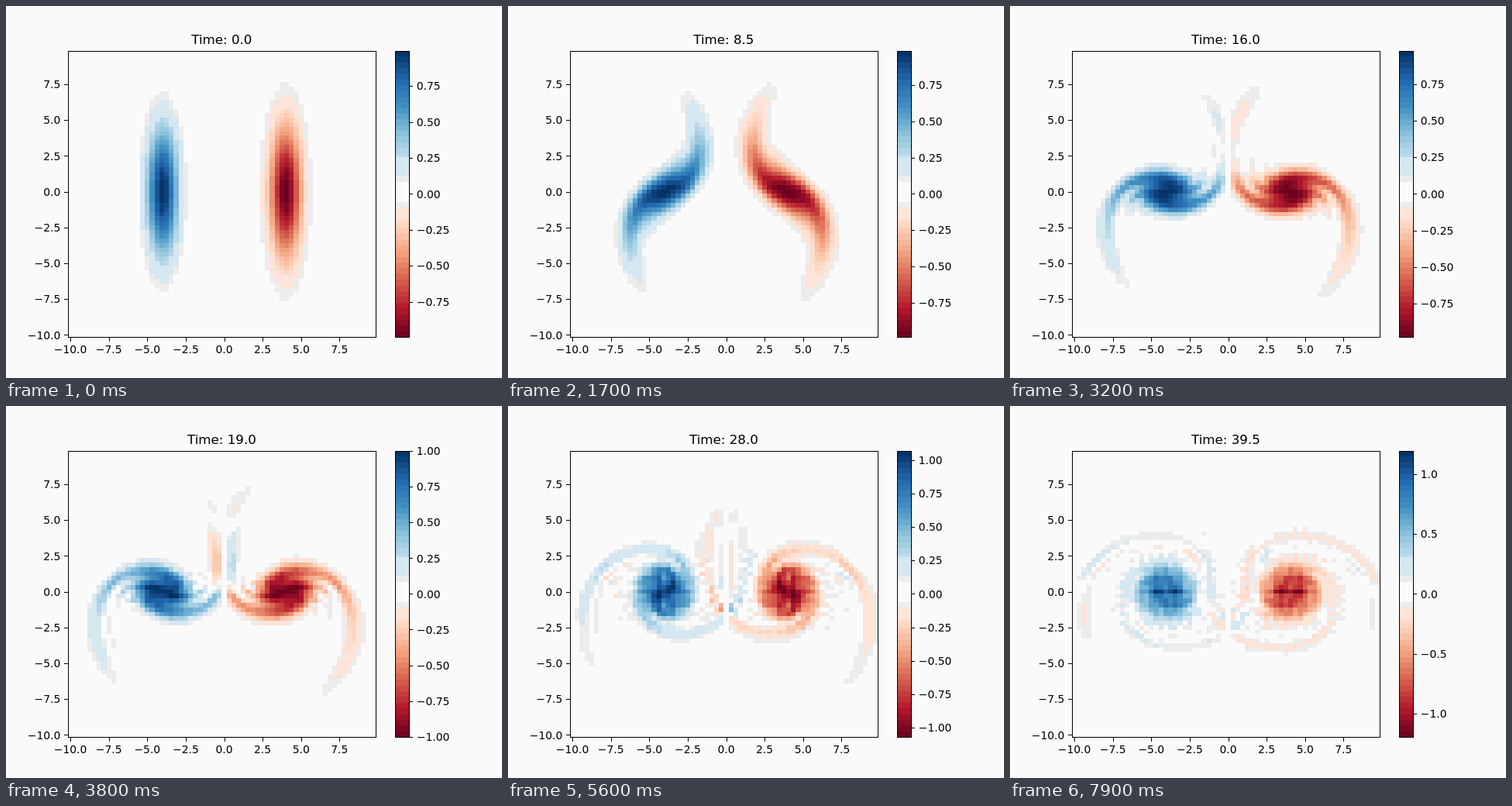
These frames come from a looping animation (640x480 px, 8000 ms). An HTML page with a canvas:

```html
<!DOCTYPE html>
<html lang="en">
<head>
<meta charset="utf-8">
<title>Vorticity</title>
<style>
html, body { margin: 0; width: 100%; height: 100%; overflow: hidden; background: #fafafa; }
canvas, svg { position: absolute; left: 0; top: 0; width: 640px; height: 480px; }
text { font: 13.89px "DejaVu Sans", sans-serif; fill: #000; }
.title { font-size: 16.67px; }
path, rect { fill: none; stroke: #000; stroke-width: 1; shape-rendering: crispEdges; }
</style>
</head>
<body>
<canvas id="plot" width="640" height="480"></canvas>
<svg viewBox="0 0 640 480">
  <g id="axes"></g>
  <g id="scale"></g>
  <text id="title" class="title" x="278.4" y="49.2" text-anchor="middle"></text>
</svg>
<script>
const N = 64, L = 20, H = L / N, NU = 0.001;
const FRAMES = 80, FRAME_MS = 100, FRAME_DT = 0.5, SUBSTEPS = 4;
const BOX = { x: 80, y: 57.6, w: 396.8, h: 369.6 };
const BAR = { x: 502, w: 18, mid: 242.4, half: 184.8 };

// ---- Poisson solver -------------------------------------------------
const cosT = [], sinT = [], bitrev = [];
for (let i = 0; i < N; i++) {
  cosT.push(Math.cos(2 * Math.PI * i / N));
  sinT.push(Math.sin(2 * Math.PI * i / N));
  let r = 0;
  for (let b = 0; b < 6; b++) if (i >> b & 1) r |= 32 >> b;
  bitrev.push(r);
}

function fftLine(re, im, start, stride, sign) {
  for (let i = 0; i < N; i++) {
    const j = bitrev[i];
    if (j <= i) continue;
    const a = start + i * stride, b = start + j * stride;
    [re[a], re[b]] = [re[b], re[a]];
    [im[a], im[b]] = [im[b], im[a]];
  }
  for (let half = 1; half < N; half *= 2) {
    const turn = N / (2 * half);
    for (let base = 0; base < N; base += 2 * half) {
      for (let k = 0; k < half; k++) {
        const c = cosT[k * turn], s = sign * sinT[k * turn];
        const a = start + (base + k) * stride, b = a + half * stride;
        const tr = re[b] * c - im[b] * s, ti = re[b] * s + im[b] * c;
        re[b] = re[a] - tr; im[b] = im[a] - ti;
        re[a] += tr; im[a] += ti;
      }
    }
  }
}

function fft2(re, im, sign) {
  for (let i = 0; i < N; i++) fftLine(re, im, i * N, 1, sign);
  for (let i = 0; i < N; i++) fftLine(re, im, i, N, sign);
}

const wave = i => 2 * Math.PI / L * (i < N / 2 ? i : i - N);

function streamFunction(w) {
  const re = w.slice(), im = new Float64Array(N * N);
  fft2(re, im, -1);
  for (let j = 0; j < N; j++) for (let i = 0; i < N; i++) {
    const k2 = wave(i) ** 2 + wave(j) ** 2, p = j * N + i;
    const f = k2 ? -1 / (k2 * N * N) : 0;
    re[p] *= f; im[p] *= f;
  }
  fft2(re, im, 1);
  return re;
}

// ---- Vorticity transport, central differences, RK4 ------------------
function rate(w) {
  const psi = streamFunction(w), out = new Float64Array(N * N);
  for (let j = 0; j < N; j++) {
    const row = j * N, up = (j + 1) % N * N, down = (j + N - 1) % N * N;
    for (let i = 0; i < N; i++) {
      const e = row + (i + 1) % N, o = row + (i + N - 1) % N, n = up + i, s = down + i;
      const turn = (psi[e] - psi[o]) * (w[n] - w[s]) - (psi[n] - psi[s]) * (w[e] - w[o]);
      const lap = w[e] + w[o] + w[n] + w[s] - 4 * w[row + i];
      out[row + i] = (turn / 4 + NU * lap) / (H * H);
    }
  }
  return out;
}

const plus = (a, b, f) => a.map((v, i) => v + f * b[i]);

function step(w, dt) {
  const a = rate(w), b = rate(plus(w, a, dt / 2));
  const c = rate(plus(w, b, dt / 2)), d = rate(plus(w, c, dt));
  return w.map((v, i) => v + dt / 6 * (a[i] + 2 * b[i] + 2 * c[i] + d[i]));
}

const states = [new Float64Array(N * N).map((_, p) => {
  const x = p % N * H - L / 2, y = Math.floor(p / N) * H - L / 2;
  return Math.exp(-((x + 4) ** 2) - y * y / 20);
})];

function stateAt(n) {
  while (states.length <= n) {
    let w = states[states.length - 1];
    for (let k = 0; k < SUBSTEPS; k++) w = step(w, FRAME_DT / SUBSTEPS);
    states.push(w);
  }
  return states[n];
}

// ---- Colours --------------------------------------------------------
const RDBU = ["67001f", "b2182b", "d6604d", "f4a582", "fddbc7", "f7f7f7",
  "d1e5f0", "92c5de", "4393c3", "2166ac", "053061"]
  .map(h => [0, 2, 4].map(i => parseInt(h.substr(i, 2), 16)));

function ramp(v) {
  const t = Math.min(9.999, Math.max(0, (v + 1) * 5)), i = Math.floor(t);
  return `rgb(${RDBU[i].map((c, k) => Math.round(c + (RDBU[i + 1][k] - c) * (t - i)))})`;
}

function colour(v) {
  if (v > -0.056 && v < 0.085) return "#fafafa";
  if (v > -0.095 && v < 0.126) return "#ececec";
  if (v > 0 && v < 0.256) return "#d5e7f1";
  if (v < 0 && v > -0.175) return "#fce4d8";
  const band = 0.04;
  return ramp(Math.sign(v) * (Math.floor(Math.abs(v) / band) + 0.5) * band);
}

// ---- Drawing --------------------------------------------------------
const $ = id => document.getElementById(id);
const ctx = $("plot").getContext("2d");
const label = (v, digits) => v.toFixed(digits).replace("-", "\u2212");
const text = (x, y, s, anchor) => `<text x="${x}" y="${y}" text-anchor="${anchor}">${s}</text>`;
const px = v => Math.round(v) + 0.5;

function drawAxes() {
  let out = '<rect x="80.5" y="58.5" width="397" height="369"/>';
  for (let v = -10; v < 9; v += 2.5) {
    const f = (v + L / 2 + H / 2) / L;
    const x = BOX.x + f * BOX.w, y = BOX.y + (1 - f) * BOX.h;
    out += `<path d="M${px(x)} 428v5M80 ${px(y)}h-5"/>`;
    out += text(x, 447.6, label(v, 1), "middle") + text(70.3, y + 5.2, label(v, 1), "end");
  }
  $("axes").innerHTML = out;
}

function drawScale(max) {
  const gap = max > 1.125 ? 0.5 : 0.25, digits = gap === 0.5 ? 1 : 2;
  let out = '<rect x="502.5" y="58.5" width="18" height="369"/>';
  for (let k = -4; k <= 4; k++) {
    const v = k * gap, y = BAR.mid - v / max * BAR.half;
    if (Math.abs(v) > max) continue;
    out += `<path d="M521 ${px(y)}h4"/>` + text(529.8, y + 5.2, label(v, digits), "start");
  }
  $("scale").innerHTML = out;
}

function drawField(field, max) {
  ctx.fillStyle = "#fafafa";
  ctx.fillRect(0, 0, 640, 480);
  const edgeX = i => Math.round(BOX.x + i * BOX.w / N);
  const edgeY = j => Math.round(BOX.y + BOX.h - j * BOX.h / N);
  for (let j = 0; j < N; j++) for (let i = 0; i < N; i++) {
    const x = edgeX(i), y = edgeY(j + 1);
    ctx.fillStyle = colour(field[j * N + i] / max);
    ctx.fillRect(x, y, edgeX(i + 1) - x, edgeY(j) - y);
  }
  for (let y = 58; y < 428; y++) {
    ctx.fillStyle = colour((BAR.mid - y - 0.5) / BAR.half);
    ctx.fillRect(BAR.x, y, BAR.w, 1);
  }
}

function drawFrame(n) {
  const w = stateAt(n);
  // The second vortex is the mirrored negative of the first.
  const field = w.map((v, p) => v - w[p - p % N + (N - p % N) % N]);
  const max = field.reduce((m, v) => Math.max(m, Math.abs(v)), 0);
  drawField(field, max);
  drawScale(max);
  $("title").textContent = "Time: " + (n * FRAME_DT).toFixed(1);
}

let start = null, shown = -1;
function tick(now) {
  if (start === null) start = now;
  const n = Math.floor((now - start) / FRAME_MS) % FRAMES;
  if (n !== shown) drawFrame(shown = n);
  requestAnimationFrame(tick);
}

drawAxes();
drawFrame(0);
requestAnimationFrame(tick);
</script>
</body>
</html>
```
